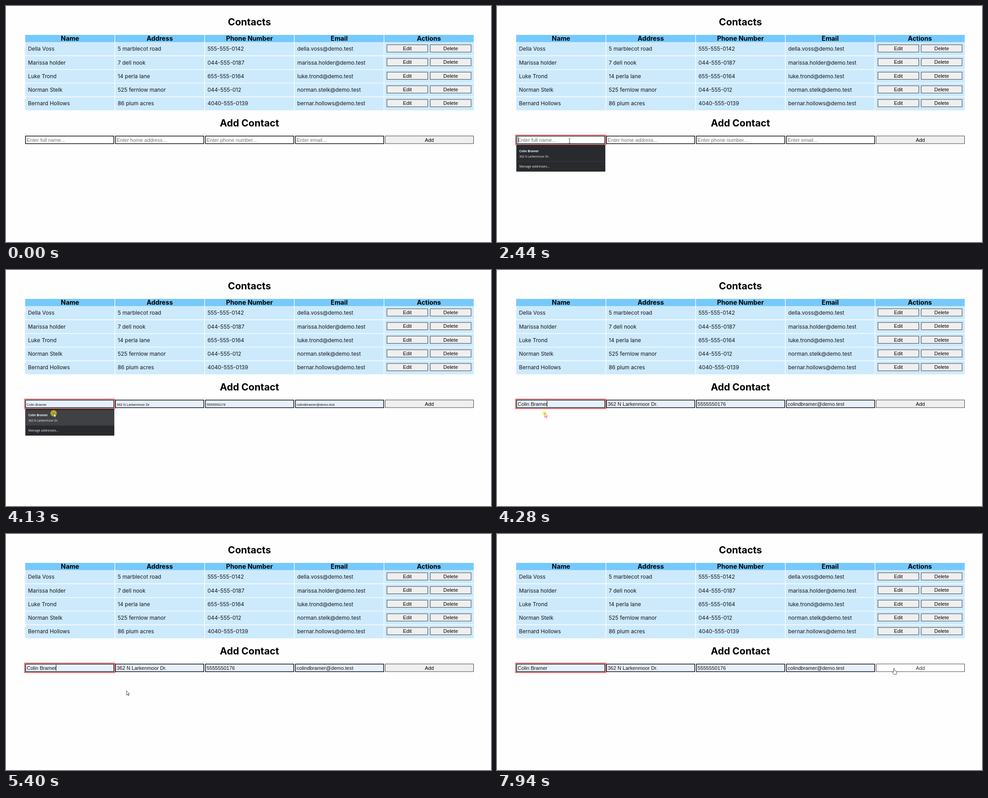
Write an HTML page that moves like this. It is 1070 px wide and 523 px high and loops after 8 s.

```html
<!DOCTYPE html>
<html lang="en">
<head>
<meta charset="utf-8">
<title>Contacts</title>
<style>
  html, body { margin: 0; height: 100%; overflow: hidden; background: #fefefe; }
  svg { display: block; }
  text { white-space: pre; }
  .title, .head, .cell { font-family: Inter, sans-serif; }
  .title { font-size: 21.4px; font-weight: 700; text-anchor: middle; }
  .head { font-size: 14.2px; font-weight: 700; text-anchor: middle; }
  .cell { font-size: 11.9px; fill: #161616; }
  .ui { font: 11.2px "Liberation Sans", Arial, sans-serif; }
  .mid { text-anchor: middle; }
  .button { fill: #efefef; stroke: #222; stroke-width: .85; }
  .input { fill: #fefefe; stroke: #000; stroke-width: 1.4; }
  .gap { stroke: #fefefe; stroke-width: 1.4; }
  .menu { font: 6.6px "Open Sans", sans-serif; fill: #f1f2f4; }
</style>
</head>
<body>
<svg id="stage" width="1070" height="523" viewBox="0 0 1070 523"></svg>
<script>
const LOOP = 8000;
const heads = ["Name", "Address", "Phone Number", "Email", "Actions"];
const rows = [
  ["Della Voss", "5 marblecot road", "555-555-0142", "della.voss@demo.test"],
  ["Marissa holder", "7 dell nook", "044-555-0187", "marissa.holder@demo.test"],
  ["Luke Trond", "14 perla lane", "655-555-0164", "luke.trond@demo.test"],
  ["Norman Stelk", "525 fernlow manor", "044-555-012", "norman.stelk@demo.test"],
  ["Bernard Hollows", "86 plum acres", "4040-555-0139", "bernar.hollows@demo.test"]
];
const hints = ["Enter full name...", "Enter home address...", "Enter phone number...", "Enter email..."];
const entry = ["Colin Bramer", "362 N Larkenmoor Dr.", "5555550176", "colindbramer@demo.test"];

const rect = (x, y, w, h, attrs) => `<rect x="${x}" y="${y}" width="${w}" height="${h}" ${attrs}/>`;
const text = (x, y, s, cls, attrs = "") => `<text x="${x}" y="${y}" class="${cls}" ${attrs}>${s}</text>`;
const line = (x1, y1, x2, y2, attrs) => `<path d="M${x1} ${y1}L${x2} ${y2}" ${attrs}/>`;

const LEFT = 42.4, COL = 197.9, TOP = 80, ROW = 30.3, FIELD = 198.45;

function table() {
  let s = rect(LEFT, 64, COL * 5, 16, 'fill="#76c9fb"') +
          rect(LEFT, TOP, COL * 5, ROW * 5 - .5, 'fill="#cdeafd"');
  heads.forEach((h, i) => {
    const x = LEFT + COL * i;
    if (i) s += line(x, 64, x, 232, 'class="gap"');
    s += text(x + COL / 2, 76.5, h, "head");
  });
  rows.forEach((row, r) => {
    const y = TOP + ROW * r, by = y + 5.9;
    if (r) s += line(LEFT, y, LEFT + COL * 5, y, 'class="gap"');
    row.forEach((v, i) => s += text(48.5 + 198 * i, y + 19.2, v, "cell"));
    ["Edit", "Delete"].forEach((b, i) => {
      const x = 840.5 + 95.5 * i;
      s += rect(x, by, 90, 16.2, 'class="button"') + text(x + 45, by + 12, b, "ui mid");
    });
  });
  return s;
}

function form() {
  let s = "";
  hints.forEach((_, i) => {
    s += rect(43.1 + FIELD * i, 288.3, 194.8, 16.8, `class="input" id="box${i}"`) +
         text(45.8 + FIELD * i, 300.5, "", "ui", `id="val${i}"`);
  });
  return s + rect(836.5, 288, 195, 17, 'class="button" id="add"') +
    text(934, 300.5, "Add", "ui mid", 'id="addText"') +
    rect(40.9, 286, 199.3, 21.3, 'id="ring" fill="none" stroke="#e5262a" stroke-width="1.2"') +
    rect(46, 290, 1, 13, 'id="caret"');
}

const menu = `<g id="menu">
  ${rect(42.6, 307.5, 196.4, 59.6, 'fill="#292a2d" rx="1"')}
  ${rect(42.6, 310.5, 196.4, 33.5, 'id="pick" fill="#404145"')}
  ${line(42.6, 344.4, 239, 344.4, 'stroke="#3f4044" stroke-width=".8"')}
  ${text(49.3, 324.2, entry[0], "menu", 'style="font-weight:700"')}
  ${text(49.3, 336, entry[1], "menu", 'style="font-size:6.4px"')}
  ${text(49.3, 358.3, "Manage addresses...", "menu", 'style="font-size:7px"')}</g>`;

const pointer = `<circle id="click" fill="#ffee00" fill-opacity=".6"/>
  <g id="cursor" stroke-width=".8" stroke="#222" fill="#fff">
  <path id="arrow" d="M0 0V9.6L2.2 7.6 3.7 11 5.2 10.4 3.7 7.1H6.7Z"/>
  <path id="beam" fill="none" d="M-2-5H-.5L0-4.5.5-5H2M0-4.5V4.5M-2 5H-.5L0 4.5.5 5H2"/>
  <path id="hand" d="M-1.2 8V1a1.2 1.2 0 0 1 2.4 0V5L2.7 5.2 4.1 5.7 5.4 6.2 5.8 7.2V10L4.8 13.2H-.5L-2.8 9.6-3.6 7.8-2.6 7Z"/></g>`;

document.getElementById("stage").innerHTML =
  text(537, 43, "Contacts", "title") + table() +
  text(537, 266.7, "Add Contact", "title") + form() + menu + pointer;

const $ = id => document.getElementById(id);
const show = (id, on) => $(id).setAttribute("visibility", on ? "visible" : "hidden");
const set = (id, attrs) => { for (const k in attrs) $(id).setAttribute(k, attrs[k]); };
const within = (t, a, b) => t >= a && t < b;

// start, end, steps, from, to, optional bend
const moves = [
  [310, 1050, 12, [921, 507], [160, 299]],
  [3340, 3600, 5, [160, 299], [105, 317]],
  [4740, 5000, 5, [105, 317], [229, 353]],
  [5260, 5870, 10, [229, 353], [521, 309]],
  [6260, 6990, 12, [524, 309], [874, 300], [780, 324]],
  [7070, 7071, 2, [875, 301], [875, 301]],
  [7270, 7410, 3, [875, 301], [876, 298]]
];

function cursorAt(t) {
  const m = moves.filter(m => t >= m[0]).pop();
  if (!m) return null;
  const [t0, t1, n, a, b, bend] = m;
  const p = Math.min(1, Math.floor((t - t0) / (t1 - t0) * (n - 1) + 0.05) / (n - 1));
  const e = p * p * (3 - 2 * p);
  return a.map((v, i) => {
    const c = bend ? bend[i] : (v + b[i]) / 2;
    return (1 - e) ** 2 * v + 2 * e * (1 - e) * c + e * e * b[i];
  });
}

const FOCUS = 1450, FILL = 4230;
const clicks = [[1190, 1450, 160, 298.5], [4070, 4340, 105, 317.5]];

function draw(t) {
  const pos = cursorAt(t), [x, y] = pos || [0, 0];
  const inRow = pos && y > 287 && y < 306;
  const overName = inRow && x > 42 && x < 239;
  const overAdd = inRow && x > 836;
  const focused = t >= FOCUS, filled = t >= FILL;
  const preview = focused && !filled && y > 308;

  hints.forEach((hint, i) => {
    const el = $("val" + i), s = preview || filled ? entry[i] : hint;
    if (el.textContent !== s) el.textContent = s;
    el.style.fontSize = preview ? "7.5px" : "";
    el.style.fill = preview || filled ? "#111" : "#757575";
    $("box" + i).style.fill = preview || filled ? "#e8f0fe" : "";
  });
  $("box0").style.stroke = overName && !focused ? "#e8262a" : "";
  $("add").style.fill = overAdd ? "#fefefe" : "";
  $("addText").style.fill = overAdd ? "#333" : "";

  show("ring", focused);
  show("menu", focused && !filled);
  $("pick").setAttribute("visibility", preview ? "inherit" : "hidden");
  show("caret", within(t, FOCUS, 1980) || within(t, 2440, 3000) ||
    filled && (t - FILL) % 1060 < 530);
  set("caret", { x: filled ? 110 : 46 });

  const click = clicks.find(c => within(t, c[0], c[1]));
  show("click", click);
  if (click) {
    const [a, b, cx, cy] = click;
    set("click", { cx, cy, r: 8 - 4.2 * (t - a) / (b - a) });
  }

  set("cursor", {
    transform: `translate(${x.toFixed(1)} ${y.toFixed(1)})`,
    stroke: within(t, FILL, 4740) ? "#d8323a" : "#222"
  });
  show("beam", overName);
  show("hand", overAdd);
  show("arrow", pos && !overName && !overAdd);
}

const start = performance.now();
function tick() {
  draw((performance.now() - start) % LOOP);
  requestAnimationFrame(tick);
}
tick();
</script>
</body>
</html>
```
